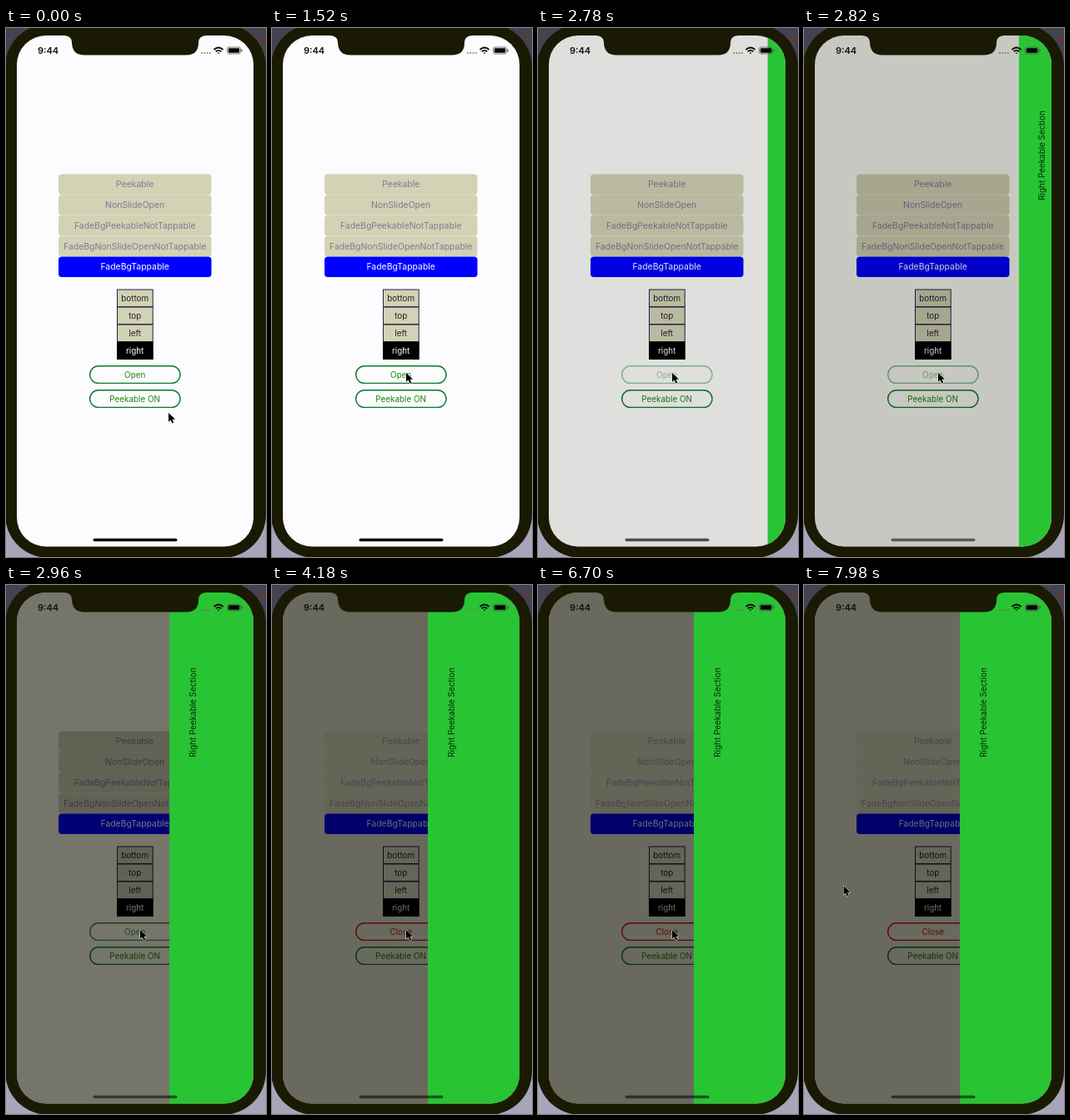
Recreate the animation shown at these times as an HTML page. Size 312x635 px, loop 8000 ms.

```html
<!DOCTYPE html>
<html lang="en">
<head>
<meta charset="utf-8">
<title>Peekable drawer</title>
<style>
  html, body { margin: 0; width: 100%; height: 100%; overflow: hidden; background: #1a1a04; }
  svg { display: block; width: 312px; height: 635px; font-family: Inter, Roboto, sans-serif; }
  text { text-anchor: middle; }
</style>
</head>
<body>
<svg viewBox="0 0 312 635">
  <defs>
    <clipPath id="display"><rect x="13" y="9" width="284" height="613.5" rx="35"/></clipPath>
  </defs>

  <!-- Desktop and phone body -->
  <rect width="312" height="635" fill="#a8a4ba"/>
  <rect width="312" height="300" fill="#424250"/>
  <path d="M302 13.5H312" stroke="#942c10" stroke-width="1.5"/>
  <rect x="-1" y="-5" width="313" height="641" rx="52" fill="#1a1a04"/>

  <g clip-path="url(#display)">
    <rect id="page" x="13" y="9" width="284" height="614"/>
    <g id="modes" font-size="10.45"></g>
    <g id="sides" font-size="9.9"></g>
    <g id="buttons" font-size="9.9" fill="none" stroke-width="1.4"></g>
    <rect id="dim" x="13" y="9" width="284" height="614"/>
    <g id="drawer">
      <rect y="9" width="120" height="614" fill="#28c434"/>
      <text transform="translate(31.5 153) rotate(-90)" font-size="9.9" fill="#082808">Right Peekable Section</text>
    </g>
    <path d="M70 8V9Q79 9.5 79 17.5Q79.500 32.500 94 32.500H216Q231 32.500 231 17.500Q231 9.500 240 9V8Z" fill="#1a1a04"/>
  </g>

  <!-- Status bar -->
  <text x="50.5" y="31" font-size="11" font-weight="600" fill="#111">9:44</text>
  <path d="M234 30H246" stroke="#77774a" stroke-width="1.5" stroke-dasharray="1.8 1.5"/>
  <g fill="none" stroke="#080808" stroke-width="1.8">
    <path d="M249.500 26Q255 21 260.500 26M251.700 28.300Q255 25.500 258.300 28.300"/>
    <path d="M253.500 29.500H256.500L255 31.200Z" fill="#080808" stroke="none"/>
  </g>
  <rect x="265.500" y="23" width="16" height="8" rx="2.300" fill="none" stroke="#555" stroke-width=".8"/>
  <rect x="266.800" y="24.200" width="13.400" height="5.600" rx="1.200" fill="#050505"/>
  <path d="M283 25.500V28.500" stroke="#555" stroke-width="1.200"/>

  <rect id="homeBar" x="104.500" y="612.700" width="101" height="3.600" rx="1.800" fill="#000"/>
  <path id="cursor" d="M0 0V10.800L2.500 8.500L4.300 12.500L6.200 11.600L4.500 7.800H8Z"
        fill="#000" stroke="#fff" stroke-width="1" stroke-linejoin="round" paint-order="stroke"/>
</svg>

<script>
const LOOP = 8000;
const GREEN = '#0b7a2a', RED = '#d81818';
const $ = id => document.getElementById(id);

function add(parent, tag, attrs, content = '') {
  const node = document.createElementNS('http://www.w3.org/2000/svg', tag);
  for (const key in attrs) node.setAttribute(key, attrs[key]);
  node.textContent = content;
  return parent.appendChild(node);
}

function box(group, label, x, y, width, height, rx, style, textFill) {
  const rect = add(group, 'rect', { x, y, width, height, rx, ...style });
  const text = add(group, 'text', { x: 154.7, y: y + height / 2 + 3.7, fill: textFill, stroke: 'none' }, label);
  return { rect, text };
}

const modes = ['Peekable', 'NonSlideOpen', 'FadeBgPeekableNotTappable', 'FadeBgNonSlideOpenNotTappable', 'FadeBgTappable']
  .map((label, i) => box($('modes'), label, 63, 175.5 + i * 24.75, 183.5, 24.4, 4,
    { fill: '#00f' }, '#fff'));

const sides = ['bottom', 'top', 'left', 'right']
  .map((label, i) => box($('sides'), label, 133.5, 314 + i * 21, 42.7, 20.5, 0,
    { fill: '#000', stroke: i < 3 ? '#24244c' : '#000' }, i < 3 ? '#20202c' : '#fff'));

const [toggle] = ['Open', 'Peekable ON']
  .map((label, i) => box($('buttons'), label, 100.7, 405.8 + i * 29, 108.3, 20.6, 10.3,
    { stroke: GREEN }, '#1c8508'));

const clamp = v => Math.min(1, Math.max(0, v));
const span = (t, from, to) => clamp((t - from) / (to - from));
const smooth = u => u * u * (3 - 2 * u);
const mix = (a, b, u) => a + (b - a) * u;

function draw(t) {
  const slide = smooth(span(t, 2687, 3020));
  const opened = t >= 3040;

  $('page').setAttribute('fill', `rgb(252 252 ${mix(255, 226, slide)})`);
  $('dim').setAttribute('fill-opacity', 0.58 * slide);
  $('drawer').setAttribute('transform', `translate(${mix(297, 187, slide)} 0)`);
  $('homeBar').setAttribute('opacity', 1 - 0.45 * clamp(slide * 4));

  const idleFill = opened ? '#f0f0d0' : '#d2d2b4';
  for (const { rect, text } of modes.slice(0, 4)) {
    rect.setAttribute('fill', idleFill);
    text.setAttribute('fill', opened ? '#a2a2be' : '#7c7c98');
  }
  for (const { rect } of sides.slice(0, 3)) rect.setAttribute('fill', idleFill);

  // Press feedback: quick fade out, slower return.
  const opacity = 1 - 0.8 * span(t, 2520, 2660) + 0.8 * span(t, 2660, 3060);
  toggle.rect.setAttribute('stroke', opened ? RED : GREEN);
  toggle.text.setAttribute('fill', opened ? RED : '#1c8508');
  toggle.text.textContent = opened ? 'Close' : 'Open';
  for (const part of [toggle.rect, toggle.text]) part.setAttribute('opacity', opacity);

  const toButton = smooth(span(t, 350, 1100)), away = smooth(span(t, 6700, 7600));
  const x = mix(mix(195, 161, toButton), 47.5, away);
  const y = mix(mix(462, 414, toButton), 361, away);
  $('cursor').setAttribute('transform', `translate(${x} ${y})`);
}

function frame() {
  draw(performance.now() % LOOP);
  requestAnimationFrame(frame);
}
frame();
</script>
</body>
</html>
```
